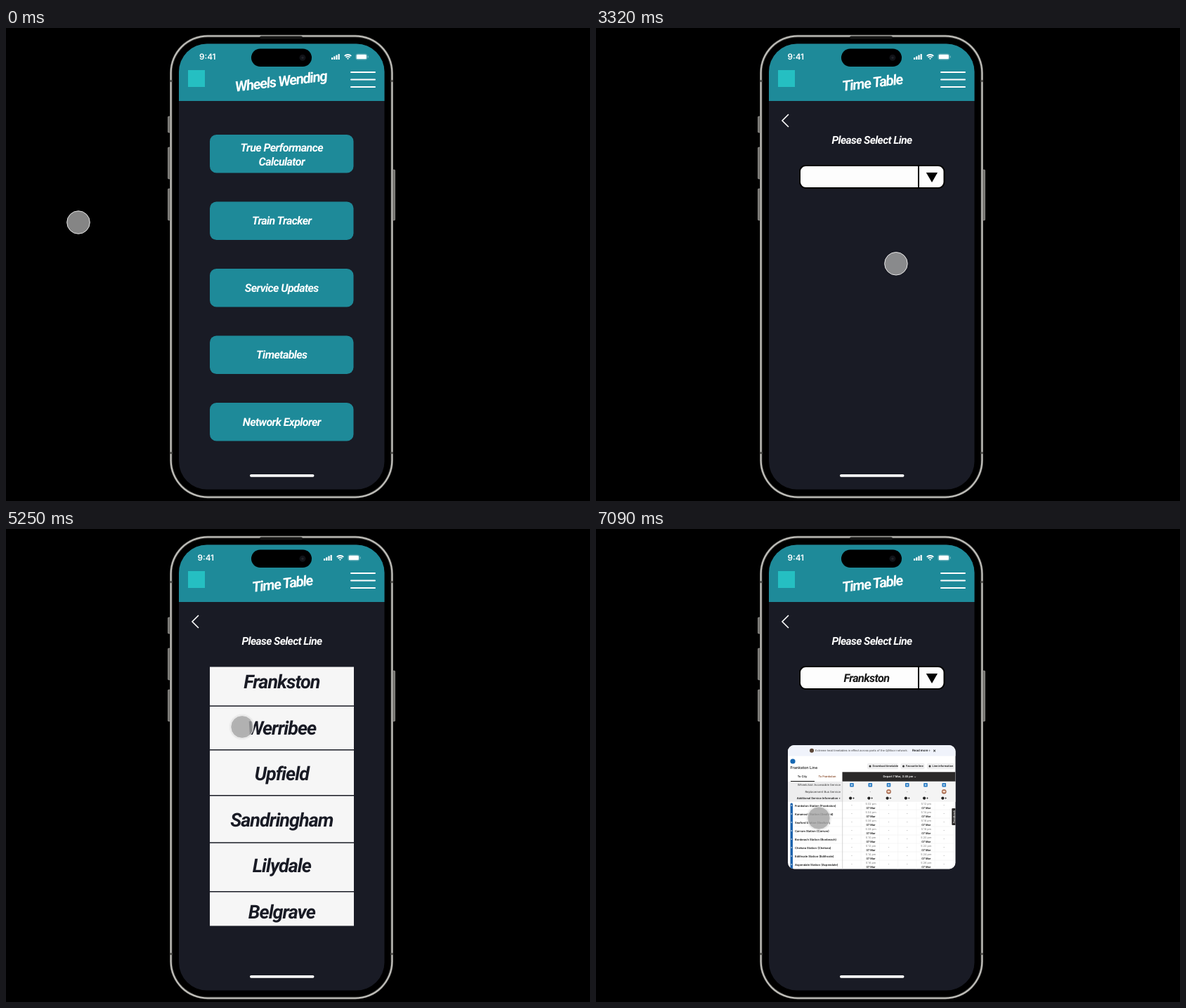
An HTML page with a canvas for the animation above (8 s loop, 831 by 674 pixels).

```html
<!DOCTYPE html>
<html lang="en">
<head>
<meta charset="utf-8">
<title>Timetable app</title>
<style>
html, body { margin: 0; width: 100%; height: 100%; overflow: hidden; background: #000; }
canvas { display: block; width: 831px; height: 674px; }
</style>
</head>
<body>
<canvas id="stage"></canvas>
<script>
const W = 831, H = 674, LOOP = 8000, STEP = 70, FADE = 490;
const DPR = window.devicePixelRatio || 1;
const TEAL = '#1e8a99', NAVY = '#191b25', WHITE = '#fff', INK = '#161616';
const small = (size, weight = 400) => `${weight} ${size}px Inter, "Open Sans", sans-serif`;

function setup(canvas) {
  canvas.width = W * DPR;
  canvas.height = H * DPR;
  const c = canvas.getContext('2d');
  c.scale(DPR, DPR);
  c.textRendering = 'geometricPrecision';
  return c;
}

function layer(paint) {
  const canvas = document.createElement('canvas');
  paint(setup(canvas));
  return canvas;
}

function box(c, x, y, w, h, r, fill, stroke, line = 1) {
  c.beginPath();
  c.roundRect(x, y, w, h, r);
  if (fill) { c.fillStyle = fill; c.fill(); }
  if (stroke) { c.strokeStyle = stroke; c.lineWidth = line; c.stroke(); }
}

function disc(c, x, y, r, fill) {
  c.beginPath();
  c.arc(x, y, r, 0, Math.PI * 2);
  c.fillStyle = fill;
  c.fill();
}

function poly(c, points, fill) {
  c.beginPath();
  points.forEach(([x, y]) => c.lineTo(x, y));
  c.closePath();
  c.fillStyle = fill;
  c.fill();
}

function path(c, points, color, width) {
  c.beginPath();
  points.forEach(([x, y]) => c.lineTo(x, y));
  c.strokeStyle = color;
  c.lineWidth = width;
  c.stroke();
}

function text(c, str, x, y, font, color, align = 'center') {
  c.font = font;
  c.fillStyle = color;
  c.textAlign = align;
  c.fillText(str, x, y);
}

// Tight slanted lettering for all app labels
function label(c, str, x, y, size, color, spacing = -0.037) {
  c.letterSpacing = size * spacing + 'px';
  text(c, str, x, y, `italic 600 ${size}px Roboto, "Liberation Sans", sans-serif`, color);
  c.letterSpacing = '0px';
}

function title(c, str, x, y) {
  c.save();
  c.translate(x, y);
  c.rotate(-0.12);
  label(c, str, 0, 7, 20.5, WHITE, -0.06);
  c.restore();
}

function phone(c) {
  c.fillStyle = '#000';
  c.fillRect(0, 0, W, H);
  const key = (x, y, h) => box(c, x, y, 3, h, 1, '#777672', '#b4b3ae', 0.6);
  key(230.5, 126, 23);
  key(230.5, 170, 45);
  key(230.5, 229, 45);
  key(550.5, 202, 72);
  const rim = (inset, fill) =>
    box(c, 233 + inset, 9.7 + inset, 318 - inset * 2, 660.5 - inset * 2, 54 - inset, fill);
  rim(0, '#5e5d5a');
  rim(0.7, '#c4c3be');
  rim(2.7, '#383836');
  rim(3.7, '#000');
  c.fillStyle = '#555450';
  for (const y of [74, 604]) {
    c.fillRect(233, y, 3.5, 3);
    c.fillRect(547.5, y, 3.5, 3);
  }
  box(c, 361, 11.5, 61, 4, 2, '#171716');
}

function status(c, timeX, iconX) {
  text(c, '9:41', timeX, 45, small(11.7, 600), WHITE, 'left');
  for (let i = 0; i < 4; i++) {
    const h = 3 + i * 1.7;
    box(c, iconX + i * 3.2, 45 - h, 2.2, h, 0.6, WHITE);
  }
  c.strokeStyle = WHITE;
  c.lineWidth = 1.8;
  for (const r of [1.2, 4.2, 7]) {
    c.beginPath();
    c.arc(iconX + 23.5, 45, r, -Math.PI * 0.74, -Math.PI * 0.26);
    c.stroke();
  }
  box(c, iconX + 34.8, 37, 16, 8, 2.3, null, 'rgba(255,255,255,.4)', 0.7);
  box(c, iconX + 35.7, 37.8, 14.2, 6.4, 1.5, WHITE);
  box(c, iconX + 51.6, 39.6, 1, 2.8, 0.5, 'rgba(255,255,255,.45)');
}

function screen(c, timeX, iconX) {
  phone(c);
  c.save();
  c.beginPath();
  c.roundRect(246, 22.5, 292.5, 635, 40);
  c.clip();
  c.fillStyle = NAVY;
  c.fillRect(246, 22, 293, 636);
  c.fillStyle = TEAL;
  c.fillRect(246, 22, 293, 82);
  c.restore();
  box(c, 349, 29.5, 86, 25.5, 12.75, '#000');
  disc(c, 422, 42.3, 4.5, '#111317');
  disc(c, 422, 42.3, 1.6, '#23252b');
  status(c, timeX, iconX);
  box(c, 259, 60, 24, 24, 0, '#25bfc2');
  for (let i = 0; i < 3; i++) box(c, 490, 62 + i * 10.5, 36, 2, 1, WHITE);
  box(c, 347, 636, 91.5, 3.7, 1.85, WHITE);
}

function home(c) {
  screen(c, 275, 463);
  title(c, 'Wheels Wending', 391, 76);
  const names = [['True Performance', 'Calculator'], ['Train Tracker'],
    ['Service Updates'], ['Timetables'], ['Network Explorer']];
  names.forEach((lines, i) => {
    const y = 152 + i * 95.5;
    box(c, 290, y, 204.5, 54.5, 9.5, TEAL);
    const first = y + 32.5 - (lines.length - 1) * 8.8;
    lines.forEach((s, n) => label(c, s, 392.3, first + n * 20.3, 16, WHITE));
  });
}

function picker(c) {
  screen(c, 272.5, 452);
  title(c, 'Time Table', 393, 78);
  path(c, [[274, 123], [265, 132], [274, 141]], WHITE, 1.6);
  label(c, 'Please Select Line', 392.5, 164.5, 15.5, WHITE);
}

function field(c, value) {
  box(c, 290, 196, 205.5, 32, 8.5, '#fdfdfd', '#000', 2);
  path(c, [[459, 196], [459, 228]], '#000', 2);
  poly(c, [[469.8, 206], [486, 206], [478, 220]], '#000');
  label(c, value, 385, 217.5, 16.2, INK);
}

function lineList(c) {
  const names = ['Frankston', 'Werribee', 'Upfield', 'Sandringham', 'Lilydale', 'Belgrave'];
  box(c, 290, 196.5, 205, 369, 0, '#f6f6f6');
  names.forEach((name, i) => {
    label(c, name, 392.3, 227 + i * 65.5, 27, NAVY);
    const y = 252.3 + i * (61.3 + i * 1.2);
    if (i < 5) path(c, [[290, y], [495, y]], NAVY, 1.5);
  });
}

function pill(c, x, w, str) {
  box(c, x, 333.8, w, 8.4, 2, '#eeeeef');
  disc(c, x + 4, 338, 1.5, '#333');
  text(c, str, x + 7.5, 339.4, small(3.8, 600), INK, 'left');
}

function cardHead(c) {
  const bold = small(4, 600), plain = small(4.2);
  c.fillStyle = '#f0f3fb';
  c.fillRect(273, 308, 239, 15.5);
  disc(c, 307, 315.8, 3, '#5c4637');
  text(c, 'Extreme heat timetables in effect across parts of the Q/Moor network.', 312, 317.3, small(4), '#444', 'left');
  text(c, 'Read more ›', 450, 317.3, small(4.4, 600), INK, 'left');
  text(c, '×', 481.5, 318.2, small(7, 500), INK);

  disc(c, 280, 331, 3.6, '#1768b3');
  text(c, 'Frankston Line', 276.5, 341.7, small(5.5, 500), INK, 'left');
  pill(c, 386, 44, 'Download timetable');
  pill(c, 433.5, 34, 'Favourite line');
  pill(c, 471, 38.5, 'Line information');

  text(c, 'To City', 293.5, 354.3, bold, INK);
  text(c, 'To Frankston', 329, 354.3, bold, '#8c5030');
  c.fillStyle = '#2b2929';
  c.fillRect(350.5, 346.3, 161, 13.5);
  text(c, 'Depart 7 Mar, 3:45 pm ⌄', 432, 354.3, bold, WHITE);
  c.fillStyle = '#ededee';
  c.fillRect(273, 359.8, 78, 29);
  c.fillStyle = '#f4f4f4';
  c.fillRect(351, 359.8, 161, 29);
  path(c, [[277, 359.5], [311, 359.5]], INK, 1);
  text(c, 'Wheelchair Accessible Service', 348, 366.3, plain, '#333', 'right');
  text(c, 'Replacement Bus Service', 348, 375.8, plain, '#333', 'right');
  text(c, 'Additional Service Information +', 348, 385.2, bold, INK, 'right');
}

function cardColumn(c, i, x) {
  box(c, x - 2.8, 362, 5.6, 5.6, 0.8, '#2b7cc4');
  disc(c, x, 364.8, 1.3, '#b8d7ef');
  if (i % 3 === 2) {
    disc(c, x, 374.3, 3.3, '#a5664a');
    box(c, x - 1.9, 372.8, 3.8, 2.6, 0.6, '#f2d7c6');
  } else {
    text(c, '-', x, 375.8, small(4.2), '#444');
  }
  disc(c, x - 1.9, 383.6, 2.1, '#222');
  text(c, '+', x + 2.5, 385.4, small(5, 700), INK);
  path(c, [[x + 13.1, 390], [x + 13.1, 485]], '#f0f0f1', 0.5);

  for (let row = 0; row < 8; row++) {
    const y = 394 + row * 12;
    if (i % 3 === 1) {
      const min = String(row * 2 + (i === 4 ? 12 : 2)).padStart(2, '0');
      text(c, `5:${min} pm`, x + 0.8, y - 1.3, small(3.9), '#777');
      text(c, '07 Mar', x + 0.8, y + 5.2, small(3.9, 600), INK);
    } else {
      text(c, '-', x, y + 1.4, small(4.2), '#555');
    }
  }
}

function card(c) {
  c.save();
  c.beginPath();
  c.roundRect(273, 308, 238.5, 176.5, 9);
  c.clip();
  c.fillStyle = WHITE;
  c.fillRect(273, 308, 239, 177);
  cardHead(c);

  box(c, 276.5, 390.5, 3.5, 100, 1.5, '#1b62ad');
  ['Frankston', 'Kananook', 'Seaford', 'Carrum', 'Bonbeach', 'Chelsea', 'Edithvale', 'Aspendale']
    .forEach((name, row) => {
      const y = 394 + row * 12;
      const town = name === 'Kananook' ? 'Seaford' : name;
      path(c, [[282, y + 6], [511, y + 6]], '#e9e9ea', 0.5);
      disc(c, 278.2, y, 0.8, WHITE);
      text(c, `${name} Station (${town})`, 283, y + 1.6, small(4.1, 600), INK, 'left');
    });
  for (let i = 0; i < 6; i++) cardColumn(c, i, 364 + i * 26.25);
  path(c, [[350.7, 360], [350.7, 485]], '#c9c9cb', 0.8);

  box(c, 506.3, 398, 6, 24, 1, '#2b2929');
  c.translate(510.5, 410);
  c.rotate(-Math.PI / 2);
  text(c, 'Feedback', 0, 0, small(4, 500), WHITE);
  c.restore();
}

// Each move bends through one control point; ease > 1 slows its end
const START = { x: 103, y: 277 };
const moves = [
  { from: 850, to: 1410, x: 420, y: 470, cx: 290, cy: 400, ease: 1.5 },
  { from: 3250, to: 4080, x: 478, y: 207, cx: 440, cy: 0, ease: 2 },
  { from: 4340, to: 5250, x: 336, y: 282, cx: 394, cy: 475, ease: 1.15 },
  { from: 5720, to: 6320, x: 501, y: 229, cx: 629, cy: 205, ease: 2 },
  { from: 6740, to: 7090, x: 317, y: 412, cx: 300, cy: 441, ease: 1.5 }
];
const fades = { empty: 2530, result: 5440 };
const PRESS = 4080, OPEN = 4150;
const beats = [0, PRESS, ...Object.values(fades), ...moves.map(m => m.from)];

function pointer(t) {
  let at = START;
  for (const m of moves) {
    if (t < m.from) break;
    const p = Math.min(1, (t - m.from) / (m.to - m.from));
    const s = 1 - (1 - p) ** m.ease;
    const bend = (a, b, c) => a * (1 - s) ** 2 + 2 * b * s * (1 - s) + c * s * s;
    at = { x: bend(at.x, m.cx, m.x), y: bend(at.y, m.cy, m.y) };
  }
  return at;
}

function drawPointer(c, { x, y }) {
  c.save();
  c.shadowColor = 'rgba(0,0,0,.3)';
  c.shadowBlur = 3 * DPR;
  disc(c, x, y, 16.3, 'rgba(175,175,175,.765)');
  c.restore();
  c.strokeStyle = 'rgba(255,255,255,.85)';
  c.lineWidth = 1;
  c.stroke();
}

function highlight(c) {
  poly(c, [[470.5, 197], [486, 197], [488, 206], [469.5, 206]], '#dbd741');
  poly(c, [[469.8, 206], [486.5, 206], [481, 215], [475, 215]], '#8f8b1e');
  poly(c, [[475, 215], [481, 215], [478, 220]], '#111');
}

const ctx = setup(document.getElementById('stage'));
const pages = {
  home: layer(home),
  empty: layer(c => { picker(c); field(c, ''); }),
  list: layer(c => { picker(c); lineList(c); }),
  result: layer(c => { picker(c); field(c, 'Frankston'); card(c); })
};

function show(page, alpha = 1) {
  ctx.globalAlpha = Math.max(0, Math.min(1, alpha));
  ctx.drawImage(page, 0, 0, W, H);
  ctx.globalAlpha = 1;
}

function frame(now) {
  const time = now % LOOP;
  const beat = Math.max(...beats.filter(b => b <= time));
  const t = beat + Math.floor((time - beat) / STEP) * STEP;

  const [under, over] = t < OPEN ? ['home', 'empty'] : ['list', 'result'];
  show(pages[under]);
  show(pages[over], (t - fades[over]) / FADE);
  drawPointer(ctx, pointer(t));
  if (t >= PRESS && t < OPEN) highlight(ctx);
  requestAnimationFrame(frame);
}

requestAnimationFrame(frame);
</script>
</body>
</html>
```
